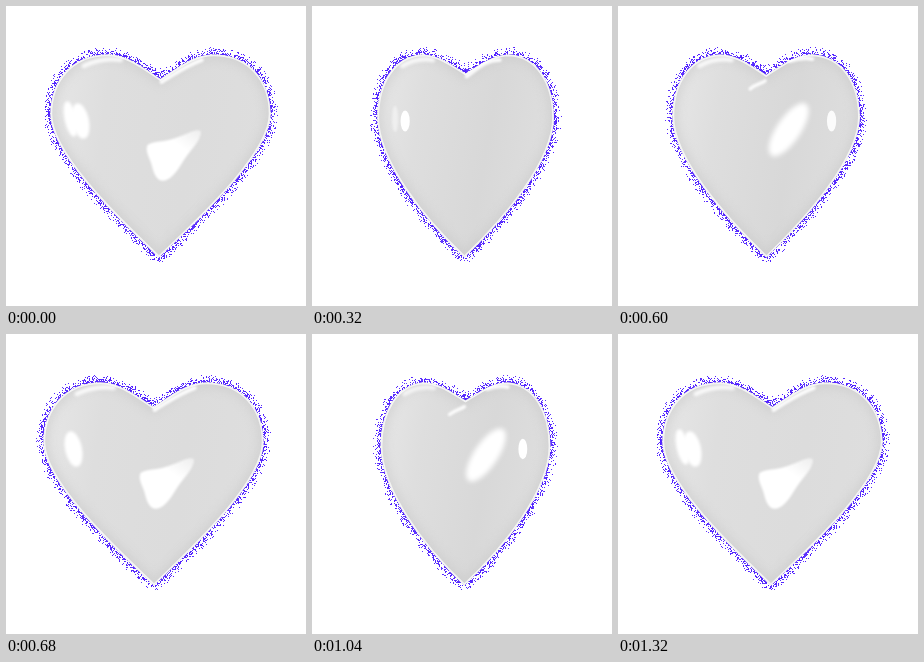
An HTML page with a canvas for the animation above (1400 ms loop, 300x300 px).

```html
<!DOCTYPE html>
<html lang="en">
<head>
<meta charset="utf-8">
<title>Spinning heart</title>
<style>
  html, body { margin: 0; width: 100%; height: 100%; overflow: hidden; background: #fff; }
  canvas { display: block; width: 300px; height: 300px; }
</style>
</head>
<body>
<canvas id="stage" width="300" height="300"></canvas>
<script>
const SIZE = 300, LOOP = 1400, STEPS = 32, TOP = 48.5;
const ctx = document.getElementById('stage').getContext('2d');
const glowCanvas = document.createElement('canvas');
glowCanvas.width = glowCanvas.height = SIZE;
const glow = glowCanvas.getContext('2d', { willReadFrequently: true });

const clamp = v => Math.max(0, Math.min(1, v));
const ramp = (a, b, v) => clamp((v - a) / (b - a));
const rad = deg => deg * Math.PI / 180;
const grey = v => `rgb(${v},${v},${v})`;

// Outline for a turn; u runs from 0 (front view) to 1 (side view)
function heart(theta, cx) {
  const c = Math.cos(theta), s = Math.sin(theta);
  const u = Math.acos(Math.min(1, Math.abs(c))) / (Math.PI / 2), uu = u * u;
  const half = Math.hypot(110 * c, 45 * s);
  const lobe = 53 - 45 * uu;
  const notch = TOP + 24.5 * Math.max(0, 1 - 1.1 * uu);
  const wide = 108 + 17 * uu;
  const shoulder = wide - (wide - TOP) * (.57 - .08 * uu);
  const outX = lobe + (half - lobe) * .62, outY = TOP + 3 * u;
  const dip = wide + 38 + 25 * uu;
  const lowX = 48 - 14 * u, lowY = 206 + 30 * uu;
  const tip = 150.5 + 2.5 * c, tipY = 251.5;
  const crestY = notch - (notch - TOP) * .5;
  const p = new Path2D();
  p.moveTo(cx, notch);
  p.bezierCurveTo(cx + lobe * .35, crestY, cx + lobe * .64, TOP, cx + lobe, TOP);
  p.bezierCurveTo(cx + outX, outY, cx + half, shoulder, cx + half, wide);
  p.bezierCurveTo(cx + half, dip, tip + lowX, lowY, tip, tipY);
  p.bezierCurveTo(tip - lowX, lowY, cx - half, dip, cx - half, wide);
  p.bezierCurveTo(cx - half, shoulder, cx - outX, outY, cx - lobe, TOP);
  p.bezierCurveTo(cx - lobe * .64, TOP, cx - lobe * .35, crestY, cx, notch);
  p.closePath();
  return { path: p, half, lobe, notch, u };
}

function noise(x, y, seed) {
  let h = Math.imul(x, 374761393) + Math.imul(y, 668265263) + Math.imul(seed, 974634541);
  h = Math.imul(h ^ (h >>> 13), 1274126177);
  h = Math.imul(h ^ (h >>> 16), 2246822519);
  return ((h ^ (h >>> 15)) >>> 0) / 4294967296;
}

// Violet grains whose density follows a blurred silhouette
function drawGrains(path, seed) {
  glow.clearRect(0, 0, SIZE, SIZE);
  glow.filter = 'blur(5px)';
  glow.fillStyle = '#000';
  glow.fill(path);
  const img = glow.getImageData(0, 0, SIZE, SIZE), d = img.data;
  for (let y = 0; y < SIZE; y++) {
    for (let x = 0; x < SIZE; x++) {
      const i = (y * SIZE + x) * 4, a = d[i + 3] / 255;
      if (!a) continue;
      const tone = noise(y, x, seed + 50);
      d[i] = 75 + 25 * tone;
      d[i + 1] = 25 + 35 * tone;
      d[i + 2] = 255;
      d[i + 3] = a > .04 && noise(x, y, seed) < a * 1.4 ? 255 : 0;
    }
  }
  glow.putImageData(img, 0, 0);
  ctx.drawImage(glowCanvas, 0, 0);
}

function soft(blur, alpha, draw) {
  if (alpha <= 0) return;
  ctx.save();
  ctx.filter = `blur(${blur}px)`;
  ctx.globalAlpha = alpha;
  draw();
  ctx.restore();
}

function line(path, color, width) {
  ctx.strokeStyle = color;
  ctx.lineWidth = width;
  ctx.lineCap = 'round';
  ctx.stroke(path instanceof Path2D ? path : new Path2D(path));
}

function spot(x, y, rx, ry, tilt, alpha, blur) {
  soft(blur, alpha, () => {
    ctx.fillStyle = '#fff';
    ctx.beginPath();
    ctx.ellipse(x, y, rx, ry, rad(tilt), 0, 7);
    ctx.fill();
  });
}

// Two reflections ride the surface across the heart
function drawReflections(turn) {
  const c = Math.cos(rad(turn)), side = Math.abs(c);
  const front = clamp((c - .75) * 4);
  const late = ramp(95, 136, turn);
  const x = -80 * c;
  const grown = 3 + 2 * side + 3.5 * front;
  const alpha = turn < 0 ? ramp(-30, -5, turn) : 1 - ramp(142, 166, turn);
  spot(x, 115, grown, 8 + 3 * side + 7 * front, -12 * front, alpha, .7 + front);
  if (turn < 0) return;
  spot(x - 10 - 56 * ramp(95, 180, turn), 113 + 8 * late + 22 * ramp(140, 180, turn),
    3 + 9 * late + 3 * front, 13 + 18 * late + 5 * front, 34 * late - 12 * front,
    (.45 + .55 * Math.max(front, ramp(40, 90, turn))) * (1 - ramp(148, 172, turn)),
    .8 + 2 * late + front);
}

const pane = new Path2D('M-13 139C-8 135 5 136 15 132C26 128 37 122 40 125'
  + 'C42 129 36 138 30 145C22 154 16 170 6 174C-2 177 -6 170 -8 162C-10 152 -16 146 -13 139Z');

function drawPane(turn) {
  const alpha = Math.max(1 - ramp(4, 30, turn), ramp(150, 174, turn));
  soft(.8, alpha, () => {
    ctx.translate(turn < 90 ? turn * .4 : (turn - 180) * .15, 0);
    const g = ctx.createLinearGradient(0, 172, 32, 124);
    g.addColorStop(.65, '#fff');
    g.addColorStop(1, '#f1f1f1');
    ctx.fillStyle = g;
    ctx.fill(pane);
  });
}

function drawCleft(turn, { notch: n, lobe: l }) {
  const flank = Math.max(1 - ramp(45, 72, turn), ramp(152, 174, turn));
  soft(1.2, flank * .9, () =>
    line(`M1 ${n + 3}C${l * .3} ${n - 6} ${l * .5} ${n - 14} ${l * .78} 54`, '#fff', 4));
  const hook = ramp(86, 95, turn) * (1 - ramp(150, 170, turn));
  soft(1.1, hook * .9, () => {
    line(`M-1 ${n + 6}C-5 ${n + 9} -10 ${n + 9} -16 ${n + 14}`, '#fff', 3.5);
    line(`M${l * .5} 55Q${l * .8} 51 ${l} 53`, '#fff', 4);
  });
  const crest = Math.max(1 - ramp(40, 75, turn), ramp(110, 140, turn));
  soft(1.8, crest * .85, () =>
    line(`M${-l * 1.45} 60Q${-l * 1.1} 51 ${-l * .75} 54`, '#fff', 4.5));
  const fold = ramp(60, 76, turn) * (1 - ramp(84, 94, turn));
  soft(1.5, fold * .9, () => {
    ctx.fillStyle = '#e9e9e9';
    ctx.fill(new Path2D('M8 48C24 64 36 84 42 114L54 100L46 46Z'));
    line('M18 64C29 76 37 92 42 114', '#c2c2c2', 2.5);
  });
}

function drawBody(h, cx, turn) {
  const g = ctx.createLinearGradient(cx - h.half, 90, cx + h.half, 120);
  g.addColorStop(0, '#e6e6e6');
  g.addColorStop(.25, grey(222));
  g.addColorStop(.65, grey(220 - 9 * h.u));
  g.addColorStop(1, '#dedede');
  ctx.fillStyle = g;
  ctx.fill(h.path);
  ctx.save();
  ctx.clip(h.path);
  soft(4, .55, () => line(h.path, '#cbcbcb', 12));
  soft(.7, .9, () => line(h.path, '#f8f8f8', 3.5));
  ctx.translate(cx, 0);
  drawCleft(turn, h);
  drawPane(turn);
  drawReflections(turn);
  drawReflections(turn - 180);
  ctx.restore();
}

function render(time) {
  const t = time % LOOP;
  const step = t < 80 ? 0 : Math.floor(t / 40) - 1;
  if (step === render.last) return;
  render.last = step;
  const eased = Math.PI * (1 - Math.cos(Math.PI * step / STEPS));
  const theta = eased + .09 * Math.min(0, Math.sin(eased));
  const turn = step % STEPS ? theta * 180 / Math.PI % 180 : 0;
  const cx = 151 + 3.5 * Math.cos(theta);
  const h = heart(theta, cx);
  ctx.fillStyle = '#fff';
  ctx.fillRect(0, 0, SIZE, SIZE);
  drawGrains(h.path, step % STEPS);
  drawBody(h, cx, turn);
}

function tick() {
  render(performance.now());
  requestAnimationFrame(tick);
}
tick();
</script>
</body>
</html>
```
